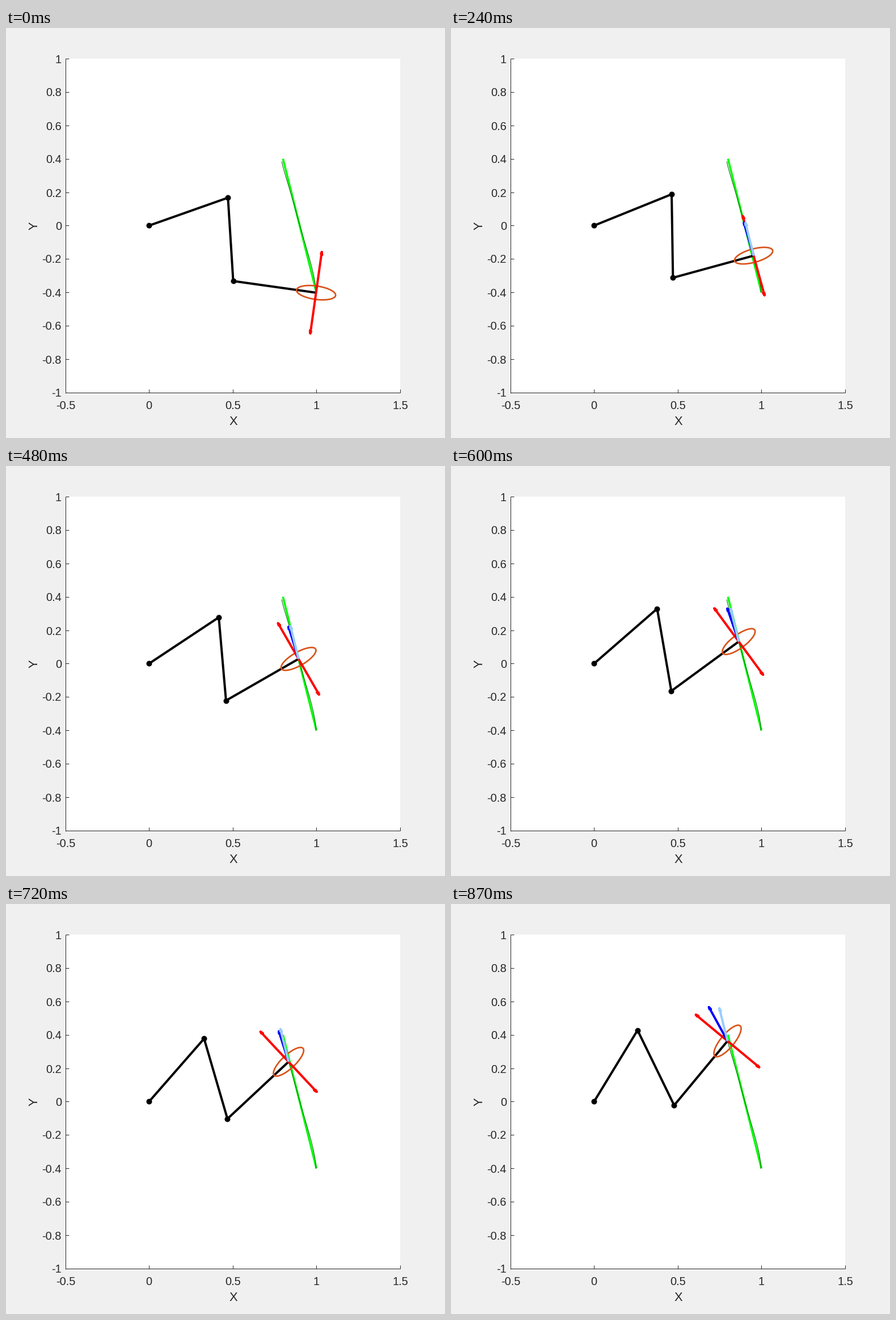
Animation, 774 px wide and 723 px high, one loop 0.9 s. Source, as a matplotlib script:

```python
import numpy as np
import matplotlib.pyplot as plt
from matplotlib.animation import FuncAnimation
from matplotlib.patches import Rectangle

W, H, DPI = 774, 723, 100
FRAMES, INTERVAL = 30, 30
PT = 72 / DPI
INK = "#262626"
LINK = 0.5

# Absolute link angles in degrees at a few times, smoothed by a polynomial.
KEYS = [0, 4, 8, 12, 16, 20, 24, 29]
ANGLES = np.array([
    [19.5, -86.4, -8.0],
    [19.3, -88.6, 4.8],
    [22.06, -89.1, 15.4],
    [27.0, -87.94, 23.4],
    [33.6, -85.1, 29.7],
    [41.1, -80.2, 36.5],
    [48.9, -73.8, 43.0],
    [58.7, -64.05, 50.4],
])
COEFFS = np.polyfit(KEYS, ANGLES, 5)

# Hand velocity, in pixels, at the same times.
VEL_X = [-4, -13, -17.5, -16.5, -18, -20.5, -17.5, -33.5]
VEL_Y = [-60, -60, -59.5, -56, -58, -59.5, -55, -61]
GOAL_VEL = np.array([-14.7, -59])


def px(x, y):
    return np.array([252.3 + 295 * np.asarray(x), 348.4 - 294.5 * np.asarray(y)])


def link_angles(t):
    powers = t ** np.arange(len(COEFFS) - 1, -1, -1.0)
    return np.radians(powers @ COEFFS)


def arm_points(t):
    a = link_angles(t)
    x = np.r_[0, np.cumsum(LINK * np.cos(a))]
    y = np.r_[0, np.cumsum(LINK * np.sin(a))]
    return px(x, y), a[2]


def arrow_points(start, vec, head=5, half=1.2, join=1.5):
    """Shaft followed by a small open head, as one stroke."""
    u = vec / np.hypot(*vec)
    n = np.array([-u[1], u[0]])
    tip = start + vec - join * u
    back = tip - head * u
    return np.array([start, tip, back + half * n, tip, back - half * n]).T


fig = plt.figure(figsize=(W / DPI, H / DPI), dpi=DPI, facecolor="#f0f0f0")
ax = fig.add_axes([0, 0, 1, 1])
ax.set_xlim(0, W)
ax.set_ylim(H, 0)
ax.axis("off")


def stroke(x, y, color, width, z, **kw):
    kw.setdefault("solid_capstyle", "butt")
    kw.setdefault("solid_joinstyle", "round")
    return ax.plot(x, y, color=color, lw=width * PT, zorder=z, **kw)[0]


def label(x, y, text, size=20, **kw):
    ax.text(x, y, text, fontsize=size * PT, color=INK,
            family="Liberation Sans", **kw)


def draw_axes():
    left, right, top, bottom = 105, 695, 54, 643
    ax.add_patch(Rectangle((left, top), right - left, bottom - top,
                           fc="white", ec="none", zorder=0))
    stroke([left, left], [top, bottom + 1], INK, 1, 1)
    stroke([left, right], [bottom, bottom], INK, 1, 1)
    for v in np.linspace(-0.5, 1.5, 5):
        x = round(px(v, 0)[0])
        stroke([x, x], [bottom, bottom - 6], INK, 1, 1)
        label(x, 671.5, f"{v:g}", ha="center", va="baseline")
    for i in range(-5, 6):
        y = round(px(0, i / 5)[1])
        stroke([left, left + 6], [y, y], INK, 1, 1)
        label(98, y + 7.5, f"{i / 5:g}", ha="right", va="baseline")
    label(400.5, 699.5, "X", 22, ha="center", va="baseline")
    label(50, 349, "Y", 22, ha="center", va="center", rotation=90)


draw_axes()

stroke(*px([1, 0.8], [-0.4, 0.4]), "#00ff00", 3.6, 2)
trace = np.array([arm_points(t)[0][:, -1] for t in np.linspace(0, 30, 91)]).T
stroke(*trace, "#006400", 1, 2.5)
arm = stroke([], [], "black", 4, 3)
joints = ax.plot([], [], "o", color="black", ms=10 * PT, mew=0, zorder=3)[0]
ellipse = stroke([], [], "#d95319", 2.7, 4)
reds = [stroke([], [], "red", 4, 5) for _ in range(2)]
actual = stroke([], [], "blue", 4, 6)
goal = stroke([], [], "#99ccff", 4, 7)

PHI = np.linspace(0, 2 * np.pi, 100)


def update(i):
    points, tilt = arm_points(i)
    hand = points[:, -1]
    arm.set_data(*points)
    joints.set_data(*points[:, :3])

    along = np.array([np.cos(tilt), -np.sin(tilt)])
    across = np.array([-np.sin(tilt), -np.cos(tilt)])
    ellipse.set_data(*(hand[:, None] + 34.8 * np.outer(along, np.cos(PHI))
                       + 11.8 * np.outer(across, np.sin(PHI))))
    for line, sign in zip(reds, (1, -1)):
        line.set_data(*arrow_points(hand, sign * 74 * across))

    vel = np.array([np.interp(i, KEYS, VEL_X), np.interp(i, KEYS, VEL_Y)])
    actual.set_data(*arrow_points(hand, vel))
    goal.set_data(*arrow_points(hand, GOAL_VEL))
    for line in (actual, goal):
        line.set_visible(i > 0)
    return arm, joints, ellipse, *reds, actual, goal


anim = FuncAnimation(fig, update, frames=FRAMES, interval=INTERVAL,
                     repeat=True, repeat_delay=0, blit=False)
plt.show()
```
